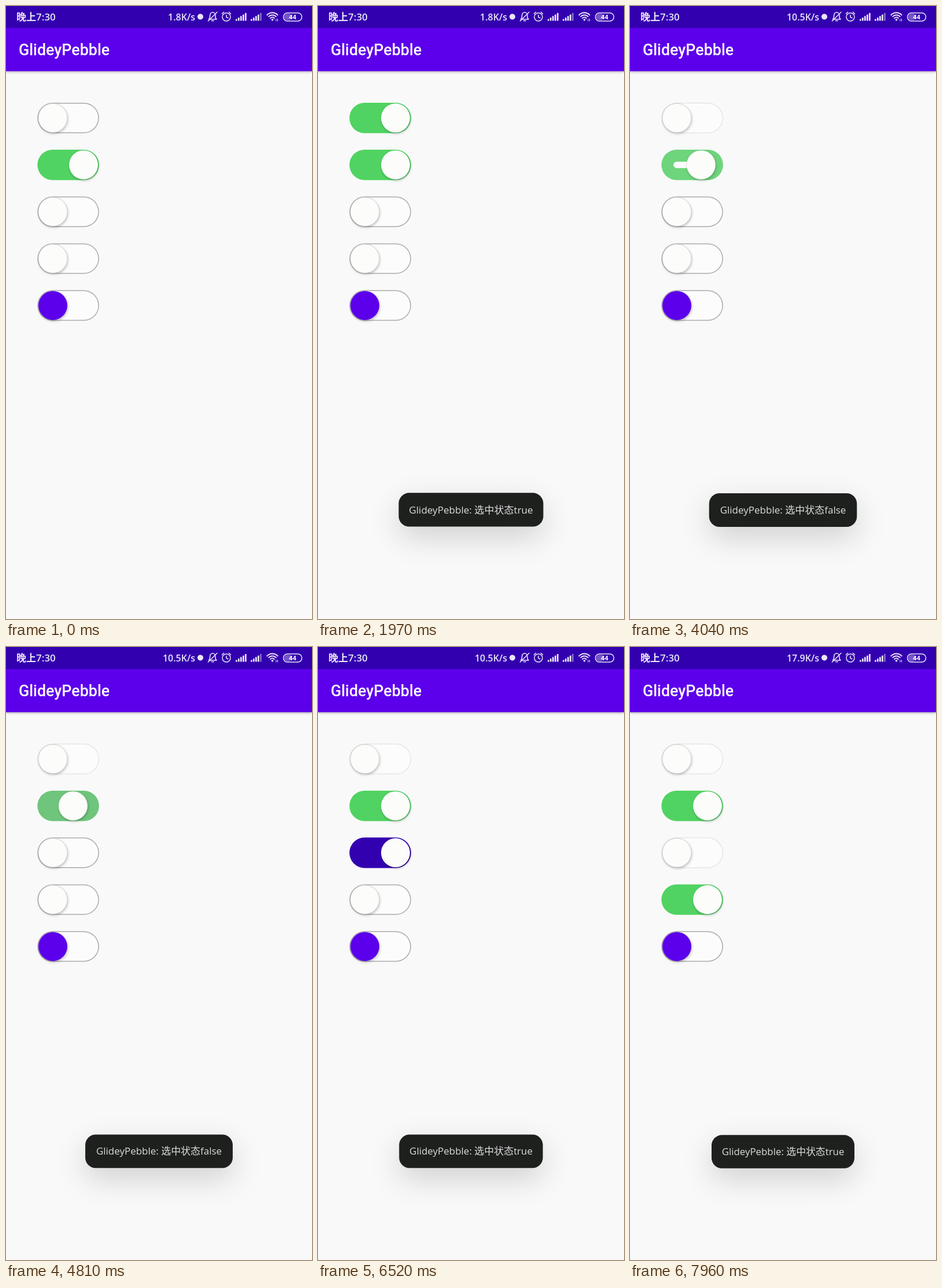
An HTML page with a canvas for the animation above (7990 ms loop, 529 px wide and 1058 px high).

```html
<!DOCTYPE html>
<html lang="zh-CN">
<head>
<meta charset="utf-8">
<style>
html, body { margin: 0; width: 100%; height: 100%; overflow: hidden; background: #f9f9fa; }
canvas { display: block; width: 100%; height: 100%; }
</style>
</head>
<body>
<canvas id="stage" width="529" height="1058"></canvas>
<script>
const g = document.getElementById('stage').getContext('2d');
const LOOP = 7990, SLIDE = 300, PRESS = 230;
const NAME = 'GlideyPebble';
const SANS = '"Open Sans", "Noto Sans CJK SC", "Noto Sans CJK", sans-serif';
const GREEN = [80, 211, 98], NAVY = [51, 0, 176], GREY = [170, 170, 170], PALE = [221, 221, 221];
const ROWS = [
  { on: false, color: GREEN },
  { on: true, color: GREEN },
  { on: false, color: NAVY },
  { on: false, color: GREEN },
  { on: false, color: GREEN, knob: '#5c00eb' }
];
// Each toggle: row, time its slide ends and its toast appears, new state
const TOGGLES = [
  [0, 1640, true], [0, 2900, false], [1, 4250, false], [1, 4930, true],
  [2, 5960, true], [2, 7000, false], [3, 7530, true]
];

const clamp = v => Math.max(0, Math.min(1, v));
const ease = x => 0.5 - 0.5 * Math.cos(Math.PI * clamp(x));
const mix = (a, b, k) => a.map((v, i) => v + (b[i] - v) * k);
const rgb = c => `rgb(${c.map(Math.round)})`;

function box(x, y, w, h, r, fill) {
  g.beginPath();
  g.roundRect(x, y, w, h, r);
  g.fillStyle = fill;
  g.fill();
}

function line(points, width = 1.5) {
  g.beginPath();
  points.forEach(([x, y], i) => i ? g.lineTo(x, y) : g.moveTo(x, y));
  g.lineWidth = width;
  g.stroke();
}

function arc(x, y, r, from = 0, to = 2 * Math.PI, width = 1.5) {
  g.beginPath();
  g.arc(x, y, r, from, to);
  g.lineWidth = width;
  g.stroke();
}

function label(text, x, y, font, color, align = 'left') {
  g.font = font;
  g.fillStyle = color;
  g.textAlign = align;
  g.fillText(text, x, y);
}

function shadow(color, blur, x, y) {
  g.shadowColor = color;
  g.shadowBlur = blur;
  g.shadowOffsetX = x;
  g.shadowOffsetY = y;
}

function signal(x, lit) {
  for (let i = 0; i < 5; i++) {
    const h = 3 + i * 2.6;
    box(x + i * 4, 25.5 - h, 2.7, h, 0.5, i < lit ? '#ebe6f7' : '#8a6fd0');
  }
}

function statusBar(t) {
  const ink = '#ebe6f7';
  box(0, 0, 529, 38, 0, '#3300b0');
  label('晚上7:30', 18, 25, '600 17px ' + SANS, ink);
  const speed = t < 2900 ? '1.8' : t < 6900 ? '10.5' : '17.9';
  label(speed + 'K/s', 327, 25, '600 16px ' + SANS, ink, 'right');

  box(331, 13.5, 10, 10, 5, ink);

  g.strokeStyle = ink;
  g.lineCap = g.lineJoin = 'round';
  // muted bell
  g.beginPath();
  g.moveTo(350.5, 23);
  g.quadraticCurveTo(353, 21, 352.5, 17);
  g.bezierCurveTo(353, 9, 362, 9, 362, 17);
  g.quadraticCurveTo(361.5, 21, 364, 23);
  g.closePath();
  g.lineWidth = 1.5;
  g.stroke();
  line([[355.5, 25.5], [359, 25.5]]);
  line([[349.5, 26], [365, 10.5]]);
  // alarm clock
  arc(381, 19, 7);
  line([[381, 15.5], [381, 19.5], [384, 20.5]]);
  line([[373.5, 13.5], [376.5, 10.5]]);
  line([[388.5, 13.5], [385.5, 10.5]]);

  signal(397, 5);
  signal(423, 4);
  // wireless
  for (const r of [4.5, 8.5, 12.5]) arc(460.5, 24, r, -Math.PI * 0.76, -Math.PI * 0.24, 2);
  box(458.8, 22, 3.5, 3.5, 1.7, ink);
  line([[467, 22.5], [467, 26]], 1);
  line([[469.5, 22.5], [469.5, 26]], 1);
  // battery
  box(481, 13.5, 13, 11, 5, '#7657c8');
  g.beginPath();
  g.roundRect(479.5, 12, 32, 14, 7);
  g.lineWidth = 1.5;
  g.stroke();
  label('44', 495.5, 23, '700 11px ' + SANS, '#fff', 'center');
}

function appBar() {
  shadow('rgba(0,0,0,.3)', 4, 0, 1.5);
  box(0, 36, 529, 76.5, 0, '#5c00eb');
  shadow('transparent', 0, 0, 0);
  label(NAME, 22, 85, '500 26.8px Roboto, sans-serif', '#fff');
}

// Knob position, fill depth from the edge (0..1) and track colour
function pose(row, index, t) {
  let s = { knob: +row.on, fill: +row.on, color: row.on ? row.color : GREY, rim: 1.5 };
  for (const [r, end, on] of TOGGLES) {
    const start = end - SLIDE;
    if (r !== index || t < start - PRESS) continue;
    const k = ease((t - start) / SLIDE);
    if (on) {
      s = {
        knob: k,
        fill: ease((t - start + PRESS) / PRESS),
        color: mix(GREY, row.color, k),
        rim: 1.5
      };
    } else {
      s = { knob: 1 - k, fill: 1 - k, color: mix(row.color, PALE, k), rim: 1 };
    }
  }
  return s;
}

function toggle(row, index, t) {
  const s = pose(row, index, t);
  const x = 54.3, y = 167 + index * 80.9, w = 106.6, h = 52.6;
  const d = Math.max(s.rim, s.fill * h / 2);
  box(x, y, w, h, h / 2, rgb(s.color));
  if (d < h / 2) box(x + d, y + d, w - 2 * d, h - 2 * d, h / 2 - d, '#fcfcfd');

  const cx = 81 + 53 * s.knob, cy = y + h / 2;
  shadow('rgba(0,0,0,.25)', 4, 1, 2);
  box(cx - 25, cy - 25, 50, 50, 25, row.knob || '#fcfcfb');
  shadow('transparent', 0, 0, 0);
  if (!row.knob) {
    g.strokeStyle = `rgba(205,205,205,${0.8 * (1 - s.knob)})`;
    arc(cx, cy, 25, 0, 2 * Math.PI, 1);
  }
}

function toast(on, age, gone) {
  const alpha = clamp(age / 120) * (1 - clamp(gone / 180));
  if (!alpha) return;
  // springs about a point below the box
  const scale = 1 + 0.135 * Math.exp(-age / 164) * Math.sin(Math.PI * (age - 90) / 260);
  const w = on ? 249 : 255.5;
  g.save();
  g.globalAlpha = alpha;
  g.translate(264.5, 998);
  g.scale(scale, scale);
  shadow('rgba(0,0,0,.17)', 52, 0, 18);
  box(-w / 2, -157, w, 58, 18, '#1e201e');
  shadow('transparent', 0, 0, 0);
  label(NAME + ': 选中状态' + on, 0, -122, '400 17px ' + SANS, '#dcdcdc', 'center');
  g.restore();
}

function draw(now) {
  const t = now % LOOP;
  box(0, 0, 529, 1058, 0, '#f9f9fa');
  appBar();
  statusBar(t);
  ROWS.forEach((row, i) => toggle(row, i, t));
  TOGGLES.forEach(([, start, on], i) => {
    const next = TOGGLES[i + 1];
    const end = Math.min(start + 2000, next ? next[1] : LOOP);
    if (t >= start) toast(on, t - start, t - end);
  });
  requestAnimationFrame(draw);
}
requestAnimationFrame(draw);
</script>
</body>
</html>
```
